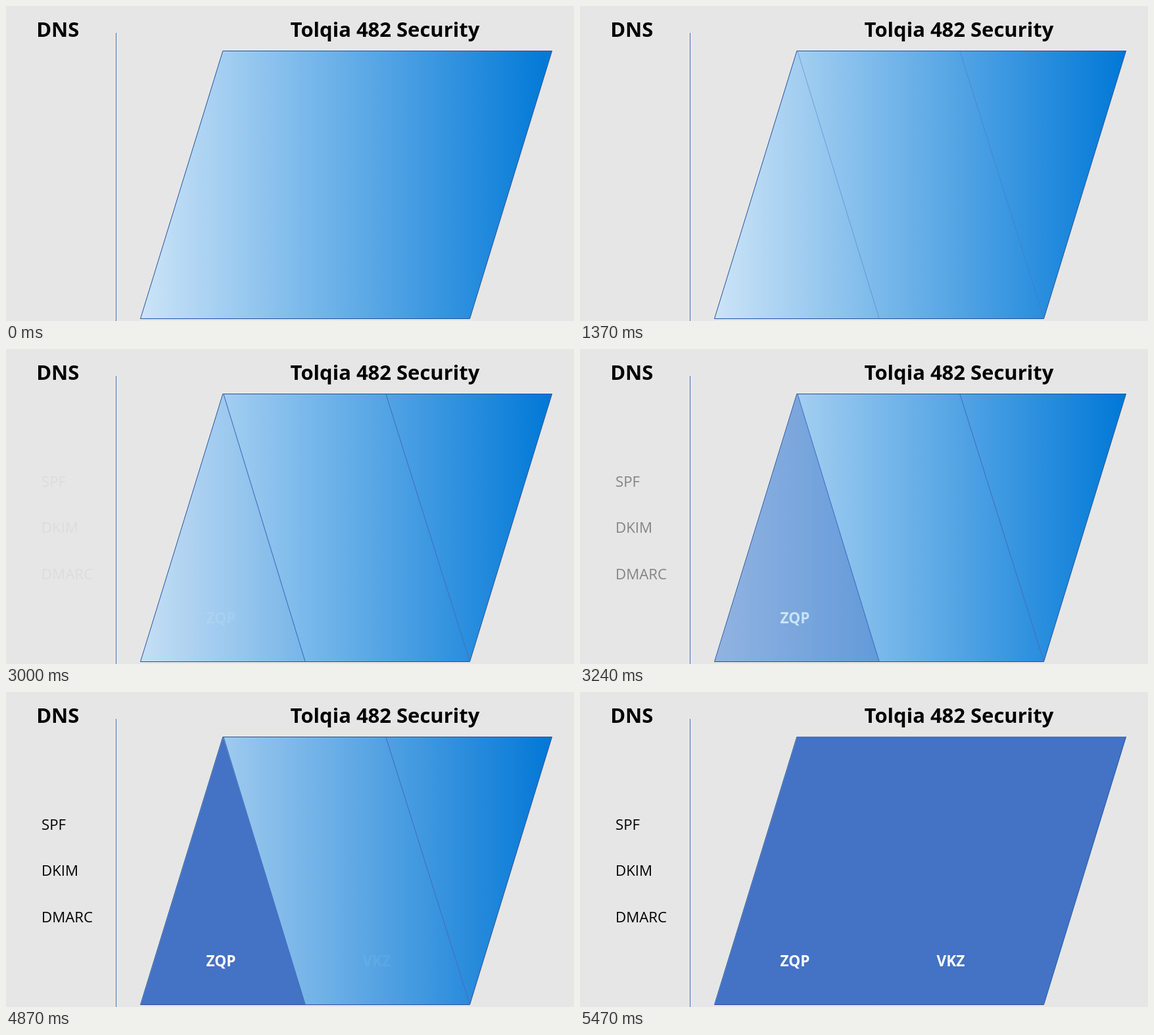
Write an HTML page that moves like this. It is 864 px wide and 480 px high and loops after 6670 ms.

```html
<!DOCTYPE html>
<html lang="en">
<head>
<meta charset="utf-8">
<title>Mail security layers</title>
<style>
  html, body { margin: 0; width: 100%; height: 100%; overflow: hidden; background: #e6e6e6; }
  svg { display: block; width: 864px; height: 480px; font-family: "Open Sans", "Noto Sans", sans-serif; }
  .title { font-size: 31px; font-weight: 700; text-anchor: middle; }
  .record { font-size: 22.2px; }
  .label { font-size: 22.6px; font-weight: 700; text-anchor: middle; fill: #fff; }
  .layer { fill: #4472c4; }
  .dividers { stroke: #4472c4; stroke-width: 1.1; fill: none; }

  /* Each fade starts faintly, then rises in 10 steps of 60 ms. */
  .fade { opacity: 0; animation: 6670ms infinite; }
  .dividers { animation-name: show-dividers; }
  .first { animation-name: show-first; }
  .second { animation-name: show-second; }
  @keyframes show-dividers {
    0% { opacity: 0; animation-timing-function: step-end; }
    16.9415% { opacity: .04; animation-timing-function: steps(10); }
    25.937%, 100% { opacity: 1; }
  }
  @keyframes show-first {
    0% { opacity: 0; animation-timing-function: step-end; }
    44.9775% { opacity: .04; animation-timing-function: steps(10); }
    53.973%, 100% { opacity: 1; }
  }
  @keyframes show-second {
    0% { opacity: 0; animation-timing-function: step-end; }
    73.0134% { opacity: .04; animation-timing-function: steps(10); }
    82.0089%, 100% { opacity: 1; }
  }
</style>
</head>
<body>
<svg viewBox="0 0 864 480">
  <defs>
    <linearGradient id="blue">
      <stop offset="0" stop-color="#cce4f7"/>
      <stop offset="1" stop-color="#0078d7"/>
    </linearGradient>
  </defs>

  <text class="title" x="78.8" y="47">DNS</text>
  <text class="title" x="576.5" y="47">Tolqia 482 Security</text>
  <rect x="167" y="41" width="1" height="439" fill="#4472c4"/>

  <path d="M329.8 68.5H830.5L705.5 476.5H204.5Z" fill="url(#blue)" stroke="#24509c"/>
  <path class="fade dividers" d="M331 69L455 476M578 69L705.5 476"/>

  <g class="fade first">
    <path class="layer" d="M330.3 69L455.5 476H205.2Z"/>
    <text class="label" x="327" y="418">ZQP</text>
    <g class="record">
      <text x="54" y="210">SPF</text>
      <text x="54" y="280">DKIM</text>
      <text x="54" y="351">DMARC</text>
    </g>
  </g>

  <g class="fade second">
    <path class="layer" d="M329.5 68H830L705 476H455Z"/>
    <text class="label" x="564" y="418">VKZ</text>
  </g>
</svg>
</body>
</html>
```
